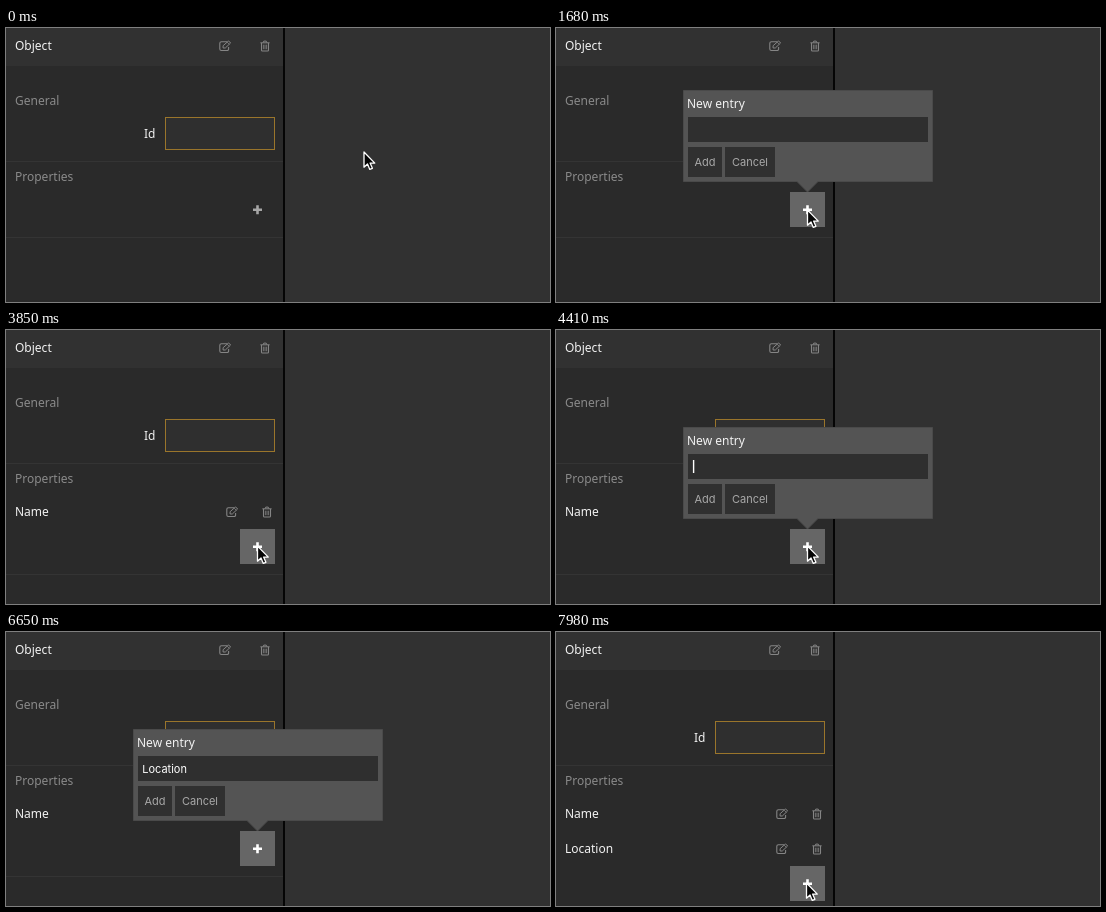
An HTML page that plays this animation: 544x274 px, repeating every 8000 ms.

```html
<!DOCTYPE html>
<html lang="en">
<head>
<meta charset="utf-8">
<title>Adding properties</title>
<style>
  html, body { margin: 0; width: 100%; height: 100%; overflow: hidden; background: #313131; }
  svg { display: block; width: 544px; height: 274px; }
  text { font: 12px "Noto Sans", "Open Sans", sans-serif; fill: #f2f2f2; }
  .muted { fill: #8a8a8a; }
  .field, .btn { font: 11px Inter, Roboto, sans-serif; }
  .field { fill: #fff; }
  .btn { fill: #a9a9a9; }
  .icon { color: #858585; }
  .plus { fill: #a6a6a6; }
  .hot { fill: none; }
  .on > .hot { fill: #666; }
  .on > .icon { color: #fff; }
  .on > .plus { fill: #fff; }
  .line { fill: #343434; }
</style>
</head>
<body>
<svg viewBox="0 0 544 274">
  <defs>
    <g id="edit" fill="none" stroke="currentColor">
      <path d="M2.2-4.3H-3.6Q-5.2-4.3-5.2-2.7V2.9Q-5.2 4.5-3.6 4.5H2Q3.6 4.5 3.6 2.9V1" stroke-width="1.1"/>
      <path d="M-1.9 2V-.3L3.6-5.1L5.6-3L.3 2Z" stroke-width="1"/>
      <path d="M2.2-3.8L4.3-1.7" stroke-width=".8"/>
    </g>
    <g id="trash" fill="none" stroke="currentColor">
      <path d="M-4.6-3.2H4.6M-1.8-3.4L-1.2-4.9H1.2L1.8-3.4" stroke-width="1"/>
      <path d="M-3.5-3V3.9Q-3.5 5-2.5 5H2.5Q3.5 5 3.5 3.9V-3" stroke-width="1.1"/>
      <path d="M-1.6-1.3V3.2M0-1.3V3.2M1.6-1.3V3.2" stroke-width=".8"/>
    </g>
    <clipPath id="panel"><rect width="277" height="274"/></clipPath>
  </defs>

  <rect width="544" height="274" fill="#313131"/>
  <rect width="277" height="274" fill="#2a2a2a"/>
  <rect width="277" height="38" fill="#313131"/>
  <rect x="277" width="2" height="274" fill="#050505"/>
  <text x="9" y="22">Object</text>
  <use href="#edit" class="icon" x="219" y="18"/>
  <use href="#trash" class="icon" x="259" y="18"/>
  <text x="9" y="77" class="muted">General</text>
  <text x="138" y="110">Id</text>
  <rect x="159.5" y="89.5" width="109" height="32" fill="#2f2f2f" stroke="#9a752b"/>
  <rect class="line" y="133" width="277" height="1"/>
  <text x="9" y="153" class="muted">Properties</text>

  <g clip-path="url(#panel)">
    <g id="rows"></g>
    <g id="add">
      <rect class="line" y="209" width="277" height="1"/>
      <rect class="hot" x="234" y="164" width="35" height="35"/>
      <path class="plus" d="M250.2 177.2h2.6v3.2h3.2v2.6h-3.2v3.2h-2.6v-3.2h-3.2v-2.6h3.2z"/>
    </g>
  </g>

  <g id="popup">
    <path d="M127.5 62.5H376.5V153.5H262L251.5 164L241 153.5H127.5Z" fill="#545454" stroke="#4a4a4a"/>
    <text x="131" y="80">New entry</text>
    <rect x="132" y="89" width="240" height="25" fill="#2f2f2f"/>
    <rect x="132" y="119" width="34" height="30" fill="#303030"/>
    <rect x="169" y="119" width="50" height="30" fill="#303030"/>
    <text x="149" y="138" class="btn" text-anchor="middle">Add</text>
    <text x="194" y="138" class="btn" text-anchor="middle">Cancel</text>
    <text id="entry" x="136.2" y="106" class="field"></text>
    <rect id="caret" y="95" width="1.4" height="13" fill="#fff"/>
  </g>

  <g id="ring" fill="none">
    <circle r="22" fill="#666" stroke="#2a2a2a" stroke-width="3"/>
    <circle r="22" stroke="#eee" stroke-width="1.1"/>
    <circle r="20.6" stroke="#333" stroke-width="1.6"/>
    <circle r="19.4" stroke="#ccc" stroke-width=".9"/>
    <path d="M-1.8-5.8h2.6v3.2h3.2v2.6h-3.2v3.2h-2.6v-3.2h-3.2v-2.6h3.2z" fill="#fff"/>
  </g>
  <path id="cursor" d="M0 0V15.2L3.5 12L5.8 17.4L8.4 16.3L6.1 11.1H10.8Z" fill="#050505" stroke="#fff" stroke-width="1.3" stroke-linejoin="round"/>
</svg>

<script>
const LOOP = 8000, TICK = 70, ROW = 35;
const $ = id => document.getElementById(id);
const within = (t, from, to) => t >= from && t < to;
const show = (el, on) => el.setAttribute("visibility", on ? "visible" : "hidden");
const move = (el, x, y) => el.setAttribute("transform", `translate(${x} ${y})`);

// Each entry: popup opening, key presses, closing, and the spans with a visible caret.
const entries = [
  { word: "Name", open: 1120, keys: [2170, 2310, 2450, 2520], close: 3010,
    caret: [[1120, 1680], [2100, 3010]] },
  { word: "Location", open: 4340, keys: [5250, 5460, 5530, 5600, 5810, 5880, 6090, 6160], close: 6720,
    caret: [[4340, 4900], [5180, 6650]] }
];
const clicks = [[980, 1120, 183], [4200, 4340, 217]];

// Pointer moves: start, end, from, to.
const moves = [
  [0, 420, 358, 124, 247, 187],
  [490, 630, 247, 187, 251.5, 182],
  [3640, 3850, 251.5, 182, 251.5, 216],
  [7490, 7980, 251.5, 216, 250.5, 251]
];
const shown = [[0, 2100], [3710, 5180], [7560, LOOP]];

const rows = entries.map(({ word }, i) => {
  const g = document.createElementNS("http://www.w3.org/2000/svg", "g");
  g.innerHTML = `<rect class="hot" x="244" y="164" width="35" height="35"/>
    <text x="9" y="186">${word}</text>
    <use href="#edit" class="icon edit" x="226" y="182"/>
    <use href="#trash" class="icon" x="261" y="182"/>`;
  g.firstChild.nextElementSibling;
  move(g, 0, i * ROW);
  $("rows").append(g);
  return g;
});

const ease = p => p * p * (3 - 2 * p);

function pointer(t) {
  let [, , x, y] = moves[0];
  for (const [t0, t1, x0, y0, x1, y1] of moves) {
    if (t < t0) break;
    const p = ease(Math.min(1, (t - t0) / (t1 - t0)));
    x = x0 + (x1 - x0) * p;
    y = y0 + (y1 - y0) * p;
  }
  return { x, y, on: shown.some(s => within(t, ...s)) };
}

function draw(t) {
  const count = entries.filter(e => t >= e.close).length;
  const active = entries.find(e => within(t, e.open, e.close));
  const { x, y, on } = pointer(t);
  const top = 164 + count * ROW;
  const free = on && !active;
  const overAdd = free && within(x, 234, 269) && within(y, top, top + ROW);

  rows.forEach((g, i) => {
    const rowTop = 164 + i * ROW;
    show(g, i < count);
    g.classList.toggle("on", free && i < count && within(x, 244, 277) && within(y, rowTop, rowTop + ROW));
  });
  move($("add"), 0, count * ROW);
  $("add").classList.toggle("on", !!active || overAdd || within(t, 6720, 6790));

  $("popup").style.display = active ? "" : "none";
  if (active) {
    move($("popup"), 0, count * ROW);
    $("entry").textContent = active.word.slice(0, active.keys.filter(k => t >= k).length);
    $("caret").setAttribute("x", 136.9 + $("entry").getComputedTextLength());
    $("caret").style.display = active.caret.some(s => within(t, ...s)) ? "" : "none";
  }

  const click = clicks.find(([from, to]) => within(t, from, to));
  show($("ring"), click);
  if (click) move($("ring"), 251.5, click[2]);
  show($("cursor"), on);
  move($("cursor"), x, y);
}

const start = performance.now();
function frame() {
  const t = (performance.now() - start) % LOOP;
  draw(Math.floor(t / TICK) * TICK);
  requestAnimationFrame(frame);
}
draw(0);
requestAnimationFrame(frame);
</script>
<style>
  .on > .edit { color: #858585; }
</style>
</body>
</html>
```
